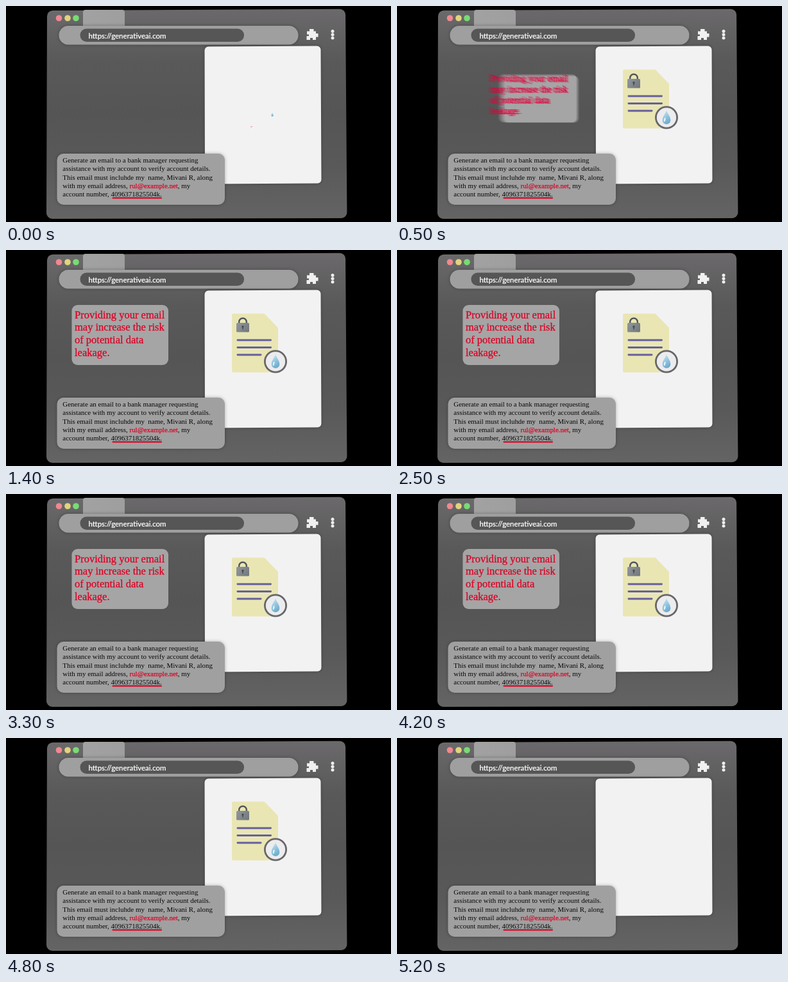
Animation of 600x338 px, one loop 5300 ms. Source, as an HTML page with a canvas:

```html
<!DOCTYPE html>
<html lang="en">
<head>
<meta charset="utf-8">
<style>
html, body { margin: 0; width: 100%; height: 100%; overflow: hidden; background: #000; }
canvas { display: block; width: 600px; height: 338px; }
</style>
</head>
<body>
<canvas id="stage" width="600" height="338"></canvas>
<script>
const W = 600, H = 338, LOOP = 5300;
const RED = '#dc0426', SERIF = '"Liberation Serif", serif';
const screen = document.getElementById('stage').getContext('2d');

function makeLayer() {
  const layer = document.createElement('canvas');
  layer.width = W;
  layer.height = H;
  return layer.getContext('2d');
}

const clamp = v => Math.min(1, Math.max(0, v));
const ease = v => v < .5 ? 4 * v ** 3 : 1 - 4 * (1 - v) ** 3;
const ramp = (t, start, length) => ease(clamp((t - start) / length));

function fillRound(c, x, y, w, h, r, color) {
  c.fillStyle = color;
  c.beginPath();
  c.roundRect(x, y, w, h, r);
  c.fill();
}

function fillCircle(c, x, y, r, color) {
  c.fillStyle = color;
  c.beginPath();
  c.arc(x, y, r, 0, Math.PI * 2);
  c.fill();
}

function fillPolygon(c, points, r, color) {
  const [last, first] = [points[points.length - 1], points[0]];
  c.fillStyle = color;
  c.beginPath();
  c.moveTo((last[0] + first[0]) / 2, (last[1] + first[1]) / 2);
  points.forEach((p, i) => c.arcTo(...p, ...points[(i + 1) % points.length], r));
  c.closePath();
  c.fill();
}

function gradient(c, x0, y0, x1, y1, ...colors) {
  const g = c.createLinearGradient(x0, y0, x1, y1);
  colors.forEach((color, i) => g.addColorStop(i / (colors.length - 1), color));
  return g;
}

function withShadow(c, draw) {
  c.save();
  c.shadowColor = 'rgba(0, 0, 0, .3)';
  c.shadowBlur = 5;
  draw();
  c.restore();
}

function write(c, text, x, y, color, weight = 0) {
  c.fillStyle = c.strokeStyle = color;
  c.fillText(text, x, y);
  if (weight) {
    c.lineWidth = weight;
    c.strokeText(text, x, y);
  }
  return x + c.measureText(text).width;
}

function scaled(c, x, y, scale, draw) {
  if (scale <= 0) return;
  c.save();
  c.translate(x, y);
  c.scale(scale, scale);
  c.translate(-x, -y);
  draw(c);
  c.restore();
}

function drawPuzzle(c) {
  c.fillStyle = '#f0f0f0';
  c.fillRect(473, 36, 6.5, 5);
  c.fillRect(469, 39.5, 14, 5);
  c.fillRect(472, 43, 14.5, 5.5);
  c.fillRect(468.5, 47, 5.5, 6);
  c.fillRect(478, 47, 5, 6);
  c.fillRect(473, 47, 6, 3);
}

function drawBrowser(c) {
  c.fillStyle = '#000';
  c.fillRect(0, 0, W, H);
  fillPolygon(c, [[64, 7], [529, 4.6], [531.5, 332], [63, 333]], 9,
    gradient(c, 0, 5, 0, 333, '#6b696b', '#595959', '#555555', '#595959', '#646464'));
  [['#f08890', 82.5], ['#e0d47c', 96], ['#78dc74', 109]]
    .forEach(([color, x]) => fillCircle(c, x, 19, 4.8, color));
  fillRound(c, 120, 6, 65, 29, [4, 4, 0, 0],
    gradient(c, 120, 6, 185, 34, '#a2a2a2', '#9e9e9e'));
  withShadow(c, () => fillRound(c, 82.5, 31, 373, 29.5, 14.5, '#9f9f9f'));
  fillRound(c, 115.5, 35.5, 255.5, 20.5, 10, '#565656');
  c.font = '500 11.4px Lato, sans-serif';
  write(c, 'https://generativeai.com', 128.5, 51, '#ffffff', .2);
  drawPuzzle(c);
  [39.5, 44.8, 50].forEach(y => fillCircle(c, 509, y, 2.5, '#eeeeee'));
  withShadow(c, () => fillPolygon(c,
    [[309.5, 63.5], [490.5, 62.5], [491.5, 277.5], [310, 278.5]], 6, '#f3f2f3'));
}

function drawPrompt(c) {
  withShadow(c, () => fillRound(c, 79.5, 231, 261.5, 80, 10, '#a0a0a0'));
  c.font = `10.95px ${SERIF}`;
  const left = 88.3, black = '#080808';
  write(c, 'Generate an email to a bank manager requesting', left, 245, black);
  write(c, 'assistance with my account to verify account details.', left, 258.3, black);
  write(c, 'This email must incluhde my  name, Mivani R, along', left, 271.6, black);
  let x = write(c, 'with my email address, ', left, 284.8, black);
  x = write(c, 'rul@example.net', x, 284.8, RED, .25);
  write(c, ', my', x, 284.8, black);
  write(c, 'account number, 4096371825504k.', left, 298, black);
  fillRound(c, 165.5, 299.2, 77.5, 2.4, 1, RED);
}

function drawPaper(c) {
  fillPolygon(c, [[352, 99.5], [402.5, 99.5], [424, 121.5], [424, 191.5], [352, 191.5]], 2, '#e9e6b4');
  [[54.5, 141], [54.5, 152.5], [39, 164]]
    .forEach(([w, y]) => fillRound(c, 359.5, y - 1.4, w, 2.8, 1.4, '#675f9c'));
  c.strokeStyle = '#50565a';
  c.lineWidth = 2.4;
  c.beginPath();
  c.moveTo(363.2, 115);
  c.lineTo(363.2, 112.5);
  c.arc(369, 112.5, 5.8, Math.PI, 0);
  c.lineTo(374.8, 115);
  c.stroke();
  fillRound(c, 359, 114, 20, 14.5, 1.5, gradient(c, 359, 114, 379, 128, '#92989c', '#70777b'));
  fillCircle(c, 369, 120, 1.7, '#454b50');
  fillRound(c, 368.3, 120, 1.4, 4.5, .5, '#454b50');
}

function drawRing(c) {
  fillCircle(c, 420, 174.5, 18, '#676669');
  fillCircle(c, 420, 174.5, 15.2, '#ececee');
}

function drawDrop(c) {
  c.fillStyle = gradient(c, 414, 166, 426, 184, '#c5e2ef', '#8dc2dd', '#67a4c6');
  c.beginPath();
  c.moveTo(420, 163.5);
  c.bezierCurveTo(422, 169, 426.3, 173, 426.3, 178.5);
  c.bezierCurveTo(426.3, 187, 413.7, 187, 413.7, 178.5);
  c.bezierCurveTo(413.7, 173, 418, 169, 420, 163.5);
  c.fill();
  c.fillStyle = '#e4f4fa';
  c.beginPath();
  c.ellipse(417.2, 178, 1.2, 3.2, .2, 0, Math.PI * 2);
  c.fill();
}

function drawCard(c) {
  fillRound(c, 102.5, 86, 150.5, 94, 9, '#a5a5a5');
}

function drawWarning(c) {
  c.font = `16.5px ${SERIF}`;
  ['Providing your email', 'may increase the risk', 'of potential data', 'leakage.']
    .forEach((line, i) => write(c, line, 107, 106.8 + i * 19.6, RED, .3));
}

// Flying pieces grow from one point beside the document and return to it.
const ORIGIN = [388, 191];
const card = {
  draw: drawCard, home: [178, 133],
  size: t => ramp(t, 0, 800) - ramp(t, 4300, 550)
};
const warning = {
  draw: drawWarning, home: [177, 131],
  size: t => Math.max(t < 300 ? .025 : 0, ramp(t, 0, 740) - ramp(t, 4215, 500))
};

function place(c, piece, size) {
  if (size <= 0) return;
  const [x, y] = piece.home;
  c.save();
  c.translate(ORIGIN[0] + (x - ORIGIN[0]) * size, ORIGIN[1] + (y - ORIGIN[1]) * size);
  c.scale(size, size);
  c.translate(-x, -y);
  piece.draw(c);
  c.restore();
}

const blur = makeLayer();

function fly(piece, t) {
  // 15 divides 255, so the summed samples reach full opacity without banding.
  const shutter = 20, samples = 15;
  const from = Math.max(0, t - shutter / 2), to = Math.min(LOOP, t + shutter / 2);
  if (Math.abs(piece.size(from) - piece.size(to)) < .0005) {
    place(screen, piece, piece.size(t));
    return;
  }
  blur.clearRect(0, 0, W, H);
  blur.globalCompositeOperation = 'lighter';
  blur.globalAlpha = 1 / samples;
  for (let i = 0; i < samples; i++) {
    place(blur, piece, piece.size(from + (to - from) * (i + .5) / samples));
  }
  screen.drawImage(blur.canvas, 0, 0);
}

function drawDocument(t) {
  const leave = ramp(t, 4820, 340);
  const size = ramp(t, 0, 420) - leave;
  const dropSize = t < 4800 ? .28 + .72 * ramp(t, 0, 420) : 1 - leave;
  scaled(screen, 388, 145, size, drawPaper);
  scaled(screen, 420, 174.5, size, drawRing);
  screen.save();
  screen.translate(-7 * (1 - dropSize), -6.2 * (1 - dropSize));
  scaled(screen, 420, 174.5, dropSize, drawDrop);
  screen.restore();
}

const backdrop = makeLayer();
drawBrowser(backdrop);
drawPrompt(backdrop);

function render(now) {
  const t = now % LOOP;
  screen.drawImage(backdrop.canvas, 0, 0);
  drawDocument(t);
  fly(card, t);
  fly(warning, t);
}

let start;
function tick(now) {
  start ??= now;
  render(Math.max(0, now - start));
  requestAnimationFrame(tick);
}
render(0);
requestAnimationFrame(tick);
</script>
</body>
</html>
```
